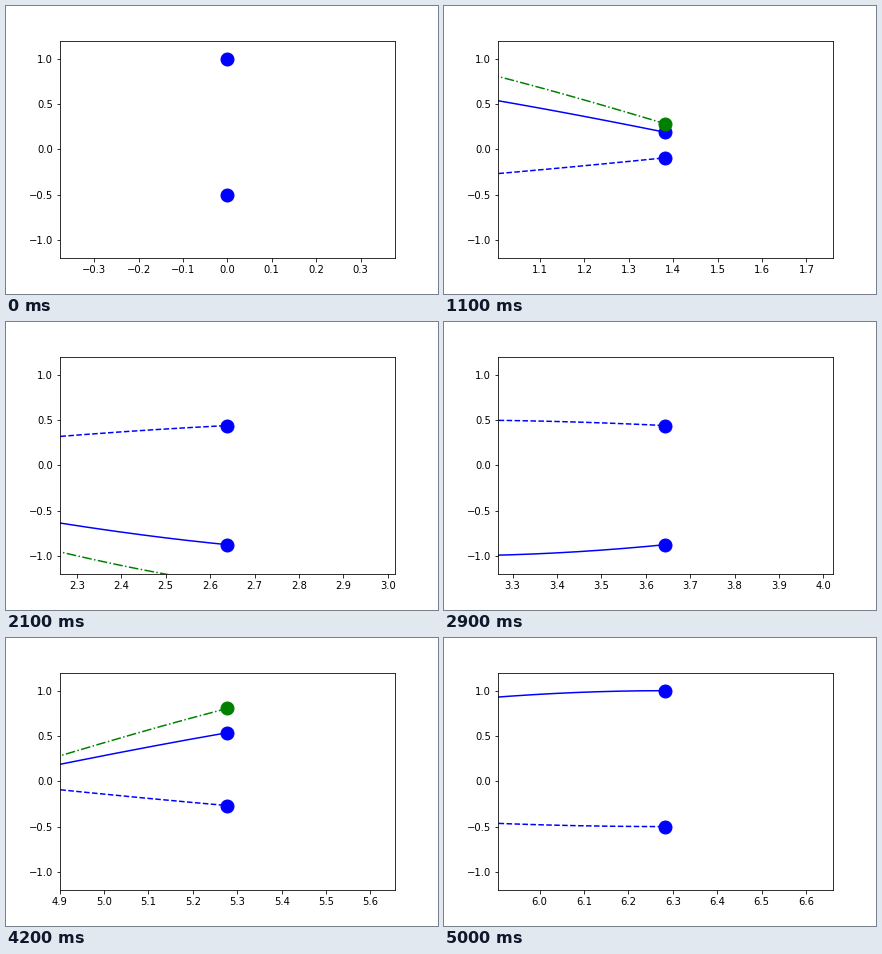
A matplotlib script for the animation above (5.1 s loop, 432 by 288 pixels).

```python
import numpy as np
import matplotlib.pyplot as plt
from matplotlib.animation import FuncAnimation

FRAMES = 51
STEP = 2 * np.pi / (FRAMES - 1)
HALF = 3 * STEP  # half the width of the sliding window
FINE = 10        # curve samples per step

fig, ax = plt.subplots(figsize=(6, 4), dpi=72)
fig.subplots_adjust(left=0.125, right=0.9, bottom=0.125, top=0.88)
ax.set_ylim(-1.2, 1.2)
ax.set_yticks([-1, -0.5, 0, 0.5, 1])

# amplitude, colour, line style
WAVES = [(1.0, "b", "-"), (-0.5, "b", "--"), (1.5, "g", "-.")]
lines = [ax.plot([], [], color=c, ls=s, lw=1.5)[0] for _, c, s in WAVES]
dots = [ax.plot([], [], color=c, marker="o", ms=13, ls="")[0]
        for _, c, _ in WAVES]


def slide_axis(center):
    """Centre the window, keeping ticks within half a pixel of its edges."""
    lo, hi = center - HALF, center + HALF
    slack = 0.5 * (hi - lo) / ax.bbox.width
    first = int(np.ceil((lo - slack) * 10))
    last = int(np.floor((hi + slack) * 10))
    values = [k / 10 for k in range(first, last + 1)]
    labels = [f"{v:.1f}".replace("-", "\u2212") for v in values]
    ax.set_xticks(np.clip(values, lo, hi), labels)
    ax.set_xlim(lo, hi)


def update(i):
    x = np.linspace(0, i * STEP, FINE * i + 1)
    for (amp, _, _), line, dot in zip(WAVES, lines, dots):
        y = amp * np.cos(x)
        line.set_data(x, y)
        dot.set_data(x[-1:], y[-1:])
    slide_axis(x[-1])
    return lines + dots


anim = FuncAnimation(fig, update, frames=FRAMES, interval=100,
                     init_func=lambda: update(0), repeat=True,
                     repeat_delay=0, blit=False)
plt.show()
```
